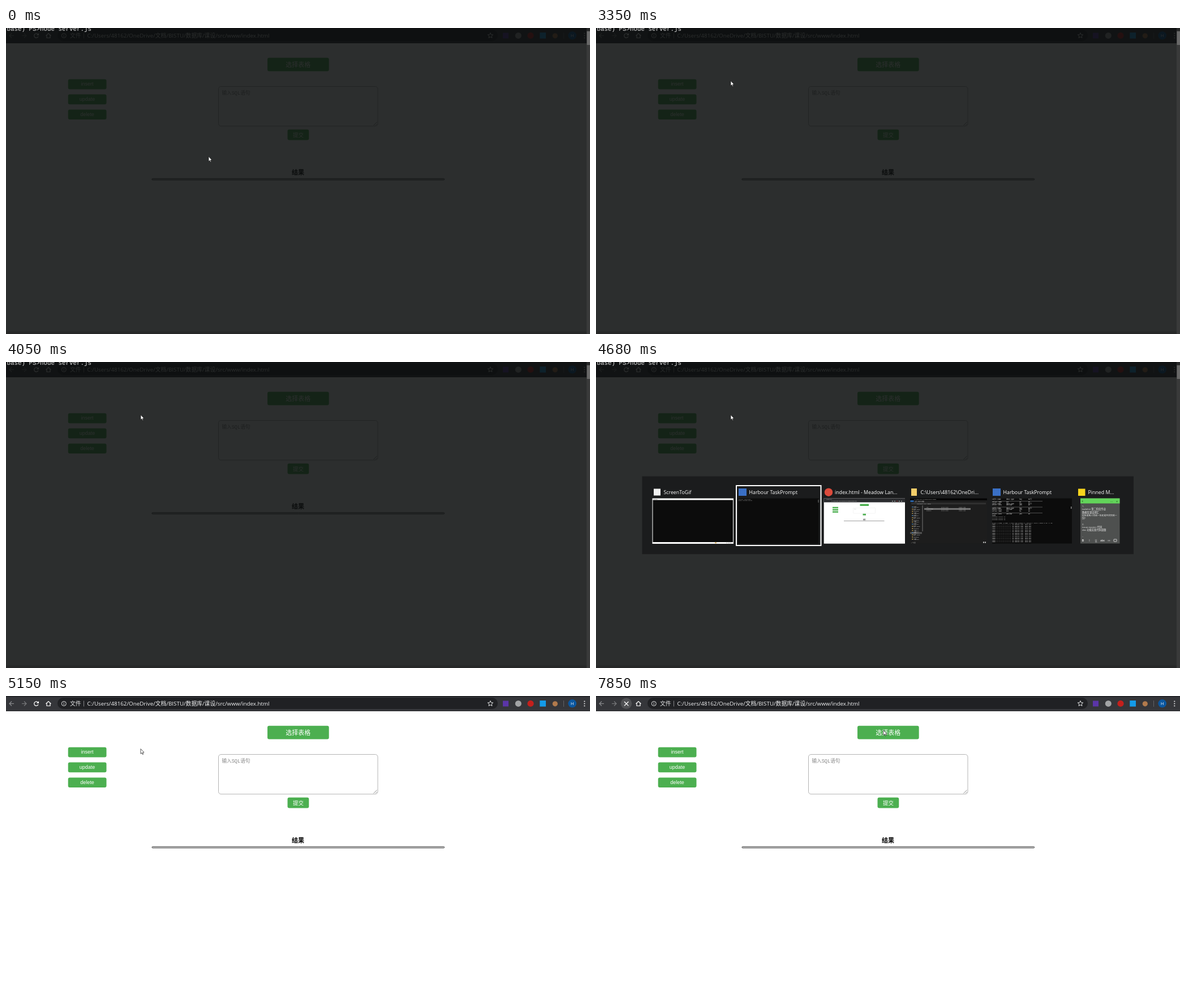
Recreate the animation shown at these times as an HTML page with a canvas. Size 1032x542 px, loop 8000 ms.

```html
<!DOCTYPE html>
<html lang="zh">
<head>
<meta charset="utf-8">
<title>Query page</title>
<style>
html, body { margin: 0; width: 100%; height: 100%; overflow: hidden; background: #fff; }
canvas { display: block; }
</style>
</head>
<body>
<canvas id="stage" width="1032" height="542"></canvas>
<script>
const ctx = document.getElementById('stage').getContext('2d');
const LOOP = 8000;
const UI = '"Open Sans", "Noto Sans CJK SC", "Noto Sans CJK", sans-serif';
const ARIAL = '"Liberation Sans", "Noto Sans CJK SC", "Noto Sans CJK", sans-serif';
const MONO = '"Liberation Mono", "Noto Sans CJK SC", "Noto Sans CJK", monospace';
const GREEN = '#4caf50';

function rect(x, y, w, h, color) {
  ctx.fillStyle = color;
  ctx.fillRect(x, y, w, h);
}

function round(x, y, w, h, r, fill, stroke) {
  ctx.beginPath();
  ctx.roundRect(x, y, w, h, r);
  if (fill) { ctx.fillStyle = fill; ctx.fill(); }
  if (stroke) { ctx.strokeStyle = stroke; ctx.lineWidth = 1; ctx.stroke(); }
}

function disc(x, y, r, color) {
  ctx.beginPath();
  ctx.arc(x, y, r, 0, Math.PI * 2);
  ctx.fillStyle = color;
  ctx.fill();
}

function line(points, color, width = 1) {
  ctx.beginPath();
  points.forEach(([x, y], i) => i ? ctx.lineTo(x, y) : ctx.moveTo(x, y));
  ctx.strokeStyle = color;
  ctx.lineWidth = width;
  ctx.stroke();
}

function text(str, x, y, size, color, font = UI, align = 'left', weight = '') {
  ctx.font = `${weight} ${size}px ${font}`;
  ctx.textAlign = align;
  ctx.fillStyle = color;
  ctx.fillText(str, x, y);
}

// Progress in n equal jumps, the first at a and the last at b
function jumps(t, a, b, n) {
  if (t < a) return 0;
  return Math.min(1, (Math.floor((t - a) / (b - a) * (n - 1) + 1e-6) + 1) / n);
}

const mix = (a, b, p) => a + (b - a) * p;
const within = (t, a, b) => t >= a && t < b;

// ---- browser page ----

function navArrow(x, dir, color) {
  line([[x - 4 * dir, 13.5], [x + 4 * dir, 13.5]], color, 1.2);
  line([[x, 9.5], [x + 4 * dir, 13.5], [x, 17.5]], color, 1.2);
}

function reloadIcon(t) {
  ctx.globalAlpha = jumps(t, 6000, 6240, 4);
  disc(53.5, 13.2, 9.8, '#505154');
  ctx.globalAlpha = 1;
  if (t >= 7850) {
    line([[50, 10], [57.4, 17.4]], '#fff', 1.3);
    line([[57.4, 10], [50, 17.4]], '#fff', 1.3);
    return;
  }
  ctx.beginPath();
  ctx.arc(53.5, 13.6, 3.7, 0.35, Math.PI * 1.75);
  ctx.strokeStyle = '#fff';
  ctx.lineWidth = 1.3;
  ctx.stroke();
  ctx.beginPath();
  ctx.moveTo(58, 9);
  ctx.lineTo(58, 13);
  ctx.lineTo(54, 13);
  ctx.fillStyle = '#fff';
  ctx.fill();
}

function star(x, y, r) {
  const pts = [];
  for (let i = 0; i <= 10; i++) {
    const a = i * Math.PI / 5 - Math.PI / 2, d = i % 2 ? r * 0.45 : r;
    pts.push([x + d * Math.cos(a), y + d * Math.sin(a)]);
  }
  line(pts, '#e4e5e6', 1);
}

function toolbar(t) {
  rect(0, 0, 1032, 27, '#35363a');
  rect(0, 0, 1032, 1.5, '#202124');
  rect(0, 26, 1032, 1, '#2a2b2e');
  round(91, 3, 778, 20, 10, '#202124');
  navArrow(10, -1, '#8b8c8f');
  navArrow(32, 1, '#77787b');
  reloadIcon(t);
  line([[70.5, 13.8], [75, 9.6], [79.5, 13.8]], '#fff', 1.2);
  line([[72, 13], [72, 17.5], [78, 17.5], [78, 13]], '#fff', 1.2);

  ctx.beginPath();
  ctx.arc(102.3, 13.5, 4, 0, 7);
  ctx.strokeStyle = '#e4e5e6';
  ctx.lineWidth = 1;
  ctx.stroke();
  rect(101.8, 13, 1, 2.6, '#e4e5e6');
  rect(101.8, 11, 1, 1, '#e4e5e6');
  text('文件', 113, 17, 9.8, '#e4e5e6');
  rect(137, 8.5, 1, 10, '#85868a');
  text('C:/Users/48162/OneDrive/文档/BISTU/数据库/课设/src/www/index.html', 143.5, 17, 9.8, '#f2f3f4');
  star(856, 13.5, 5);

  rect(878, 8.5, 10, 10, '#5b35a8');
  disc(905.3, 13.4, 5.5, '#a3a4a6');
  disc(927, 13.4, 5.6, '#c4201c');
  rect(943.3, 8, 10.7, 10.7, '#149be8');
  disc(970.3, 13.8, 4.6, '#b17a4c');
  rect(985, 8, 1, 11, '#626367');
  disc(1000.7, 13.3, 7.3, '#0b57a0');
  text('H', 1000.7, 16, 7.5, '#dfe8f2', ARIAL, 'center');
  for (const y of [9.5, 13.5, 17.5]) disc(1022.3, y, 1.1, '#e4e5e6');
}

function button(x, y, w, h, label, size, font) {
  round(x, y, w, h, 3, GREEN);
  text(label, x + w / 2, y + h / 2 + size * (font === ARIAL ? 0.31 : 0.38), size, '#fff', font, 'center');
}

function page(t) {
  rect(0, 0, 1032, 542, '#fff');
  toolbar(t);
  button(462, 52.8, 108.7, 23.6, '选择表格', 11, UI);
  ['insert', 'update', 'delete'].forEach((name, i) =>
    button(109.7, 90.8 + i * 26.8, 67.8, 17.6, name, 9, ARIAL));
  round(375.5, 103.5, 281.5, 70.3, 4.5, '#fff', '#b4b4b4');
  text('输入SQL语句', 381.5, 117.6, 8.6, '#858585', MONO);
  line([[649.5, 172.5], [655.5, 166.5]], '#777', 0.8);
  line([[653, 172.5], [655.5, 170]], '#777', 0.8);
  button(497.5, 179.8, 37.8, 18.8, '提交', 9.5, UI);
  text('结果', 516, 259.6, 11, '#000', UI, 'center', 'bold');
  round(258, 266.8, 516.7, 2.4, 1, '#ccc', '#555');
}

// ---- terminal ----

function terminal(t) {
  rect(0, 0, 1032, 542, 'rgba(12,14,14,.865)');
  rect(0, 537.5, 1032, 4.5, '#272828');
  rect(1026, 0, 6, 542, '#393a3a');
  rect(1026, 0, 6, 5, '#272828');
  rect(1026.5, 6, 5.5, 24, '#686868');
  text('(base) PS>node server.js', -5, 5, 10.83, '#e2e2e2', MONO);
  if (within(t, 1250, 1800)) rect(151, 3.2, 6.6, 3.2, '#d8d8d8');
  if (within(t, 2110, 2260) || within(t, 2800, 3350)) rect(0, 16, 1.6, 2.8, '#d8d8d8');
}

// ---- window switcher ----

function shellThumb(x) {
  rect(x, 241.5, 142.5, 80, '#0c0c0c');
  text('Harbour TaskPrompt', x + 1, 243.7, 2, '#ccc', MONO);
  text('(base) PS>node server', x, 246, 2, '#ddd', MONO);
  rect(x + 141.5, 244, 1, 5, '#777');
}

function recorderThumb(x) {
  rect(x - 0.5, 241.5, 143.5, 80.5, '#fff');
  rect(x + 0.5, 244.5, 141.5, 74.5, '#0c0c0c');
  text('recorder', x + 1, 244, 2, '#333');
  rect(x + 110, 319.5, 3, 1.5, '#d8a540');
  text('F7 F8 stop', x + 130, 321, 2, '#333');
}

function browserThumb() {
  rect(402.7, 241.5, 143.3, 80.2, '#fff');
  rect(402.7, 241.5, 143.3, 7, '#2a2b2e');
  text('index.html', 407, 244, 2, '#ddd');
  text('C:/Users/48162/OneDrive/src/www/index.html', 416, 247.4, 2.1, '#eee');
  for (let i = 0; i < 5; i++) disc(524 + i * 4, 246.5, 0.8, i === 2 ? '#b33' : '#ddd');
  rect(466.5, 251.5, 15.5, 3.5, GREEN);
  for (let i = 0; i < 3; i++) rect(418, 256.7 + i * 3.8, 10, 2.5, GREEN);
  round(454.5, 258.5, 39, 9.5, 0.6, null, '#f4f4f4');
  text('SQL', 456, 261, 2, '#999');
  rect(471.5, 268.8, 5.5, 2.8, GREEN);
  text('结果', 474.2, 280.2, 2, '#000', UI, 'center', 'bold');
  rect(438, 281, 71.5, 0.7, '#777');
}

function explorerThumb() {
  rect(555, 241.5, 136, 80, '#1d1d1d');
  rect(555, 241.5, 136, 3.5, '#050505');
  text('C:\\Users\\48162\\OneDrive\\src\\www', 562, 244.3, 2.4, '#fff');
  rect(555.5, 245.2, 6, 2.5, '#2b6fc0');
  text('主页  共享  查看', 563, 247.6, 2.4, '#eee');
  rect(557, 249.2, 132, 3, '#303030');
  text('OneDrive > src > www', 567, 251.6, 2.4, '#fff');
  for (let i = 0; i < 16; i++) {
    if (i === 12) rect(555, 301.4, 21, 3, '#555');
    rect(558.5, 256 + i * 3.8, 1.6, 1.6, i % 4 ? '#d6b45c' : '#5aa0dc');
    text(['文档 src', '图片 www', 'desktop', '下载 doc'][i % 4], 561, 257.7 + i * 3.8, 2.5, '#f4f4f4');
  }
  rect(576.5, 254, 1, 46, '#777');
  rect(580, 258.8, 82, 3, '#777');
  ['css', 'index.html', 'index.js'].forEach((name, i) => {
    const y = 258.2 + i * 2.9;
    text(name, 584, y, 2.4, '#fff');
    text('2019/12/20', 610, y, 2.4, '#fff');
    text('HTML 2 KB', 641, y, 2.4, '#fff');
  });
  text('3 个项目', 557, 320.5, 2, '#ccc');
  rect(684, 318.5, 2, 2, '#ccc');
  rect(687, 318.5, 2, 2, '#ccc');
}

function logThumb() {
  rect(700, 241.5, 141, 80, '#0c0c0c');
  const rows = ['table name      data type      key       null',
    'insert into     varchar        yes       10', 'select name     int            no        20'];
  for (let i = 0; i < 30; i++) {
    const y = 244 + i * 2.6;
    if (i < 12) {
      if (i % 4 === 1) line([[700, y], [789, y]], '#999', 0.5);
      else text(i < 11 ? rows[i % 3] : 'node', 700, y, 2.6, '#eee', MONO);
    } else if (i === 16) {
      text('select a.name, b.name, c.type from student a, course b, score c where a.id = c.id', 700, y, 2.2, '#fff', MONO);
    } else if (i > 16) {
      text('name-------------------- at Object.run, line 202', 700, y, 2.4, '#fff', MONO, 'left', 'bold');
    } else if (i < 15) {
      text('PS>node server.js', 700, y, 2.3, '#eee', MONO);
    }
  }
  rect(839, 256, 1.5, 4, '#888');
}

function noteThumb() {
  rect(856, 241.5, 69.5, 80, '#4e504f');
  rect(856, 241.5, 69.5, 9, '#62d45a');
  text('+', 858, 248.5, 6, '#193b17');
  text('×', 919, 248.5, 5.5, '#193b17');
  text('…', 909, 247.5, 5, '#193b17');
  const lines = ['1.', 'todolist 第二阶段作业', '数据库课设期汇', '报告是每人完成一份还是共同完成一',
    '份?', '', '2.', 'issue master 代码', 'dev 功能实现代码调整', '', '..'];
  lines.forEach((str, i) => text(str, 859, 257 + i * 5.3, i === 3 ? 3.85 : 4.3, '#f0f0f0'));
  ['B', 'I', 'U', 'abc', '≔'].forEach((str, i) =>
    text(str, 860.5 + i * 11.5, 318, 5, '#e4e4e4', UI, 'center', i ? '' : 'bold'));
  line([[882, 319], [885.5, 319]], '#e4e4e4', 0.5);
  line([[891.5, 316.2], [898.5, 316.2]], '#e4e4e4', 0.5);
  round(915, 314, 5, 4, 0.3, null, '#ccc');
}

function title(str, x) {
  text(str, x, 234, 8.8, '#fff');
}

function shellItem(x) {
  rect(x + 1, 224, 14, 13, '#3a70c6');
  title('Harbour TaskPrompt', x + 19.5);
}

function switcher(first, selected, noteIcon) {
  rect(81.5, 202.5, 868.5, 137.8, '#1b1c1d');
  const shellX = first ? 100 : 251, recX = first ? 251 : 100;
  shellItem(shellX);
  shellThumb(shellX);
  rect(recX + 2, 224.5, 12, 12, '#f1f1f1');
  title('ScreenToGif', recX + 19.5);
  recorderThumb(recX);

  disc(411, 230.7, 7.2, '#dc4b3c');
  title('index.html - Meadow Lan...', 422);
  browserThumb();
  rect(557, 224, 10, 13, '#f4cd69');
  title('C:\\Users\\48162\\OneDri...', 573.5);
  explorerThumb();
  shellItem(700);
  logThumb();
  if (noteIcon) rect(852, 224.5, 12.5, 12.5, '#f7d51d');
  title('Pinned M...', 869.5);
  noteThumb();

  ctx.strokeStyle = '#fff';
  ctx.lineWidth = 2;
  ctx.strokeRect(248 + (selected - 1) * 151, 219, 149.5, 106);
}

// ---- pointer ----

function pointerAt(t) {
  if (t < 5450) {
    const p = jumps(t, 70, 240, 4);
    return [mix(358, 238, p), mix(227, 93, p)];
  }
  if (t < 6000) {
    const p = jumps(t, 5450, 5840, 6), ease = p * (2 - p);
    return [mix(238, 47, ease), mix(93, 9, ease)];
  }
  if (t < 7160) {
    const p = jumps(t, 6000, 6160, 3);
    return [mix(47, 52, p), mix(9, 11, p)];
  }
  const p = jumps(t, 7160, 7680, 8), q = 1 - p;
  return [mix(52, 508, p), 11 * q * q + 2 * 164 * p * q + 60 * p * p];
}

function pointer(x, y) {
  ctx.save();
  ctx.translate(Math.round(x), Math.round(y) + 0.6);
  ctx.beginPath();
  ctx.moveTo(0, 0);
  for (const [px, py] of [[0, 8.8], [2, 7], [3.4, 10], [4.7, 9.4], [3.4, 6.5], [6, 6.3]]) ctx.lineTo(px, py);
  ctx.closePath();
  ctx.fillStyle = '#fff';
  ctx.fill();
  ctx.strokeStyle = '#111';
  ctx.lineWidth = 0.7;
  ctx.lineJoin = 'round';
  ctx.stroke();
  ctx.restore();
}

function tooltip() {
  rect(52, 24, 57, 13, '#767676');
  rect(52.7, 24.7, 55.6, 11.6, '#fff');
  text('重新加载此页', 80.5, 33.6, 8.4, '#575757', UI, 'center');
}

function draw(t) {
  ctx.globalAlpha = 1;
  page(t);
  if (t < 5150) {
    terminal(t);
    if (within(t, 3740, 4050)) {
      ctx.globalAlpha = t < 3975 ? 1 : 0.5;
      switcher(true, 1, t >= 3900);
      ctx.globalAlpha = 1;
    } else if (t >= 4680) {
      switcher(false, t < 4830 ? 1 : 2, true);
    }
  }
  if (within(t, 6410, 6700)) tooltip();
  const [x, y] = pointerAt(t);
  if (within(t, 700, 870)) disc(x - 0.5, y - 0.5, 8.5, 'rgba(255,255,0,.47)');
  pointer(x, y);
}

const start = performance.now();
function tick() {
  draw((performance.now() - start) % LOOP);
  requestAnimationFrame(tick);
}
tick();
</script>
</body>
</html>
```
